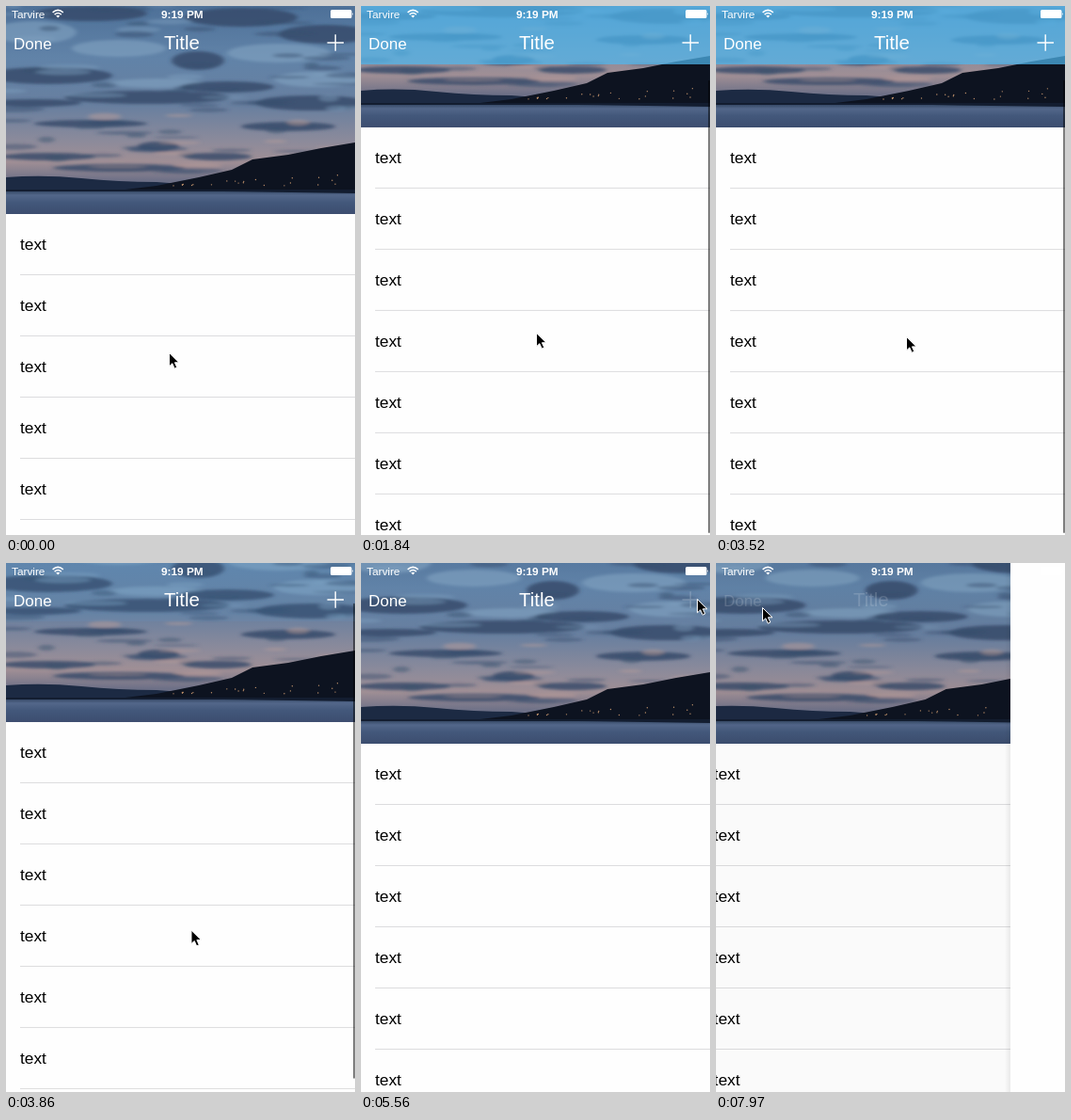
An HTML page that plays this animation: 371 by 562 pixels, repeating every 8 s.

```html
<!DOCTYPE html>
<html lang="en">
<head>
<meta charset="utf-8">
<title>Fading navigation bar</title>
<style>
  html, body { margin: 0; width: 100%; height: 100%; overflow: hidden; background: #fff; }
  svg { display: block; }
  text { font-family: "Liberation Sans", Arial, sans-serif; }
  .row { font-size: 17.3px; fill: #000; }
  .nav { font-size: 17px; fill: #fff; }
  .status { font-size: 11.8px; fill: #fff; }
  .line { fill: none; stroke: #fff; }
</style>
</head>
<body>
<svg width="371" height="562" viewBox="0 0 371 562">
  <defs>
    <linearGradient id="sky" x2="0" y2="1">
      <stop offset="0" stop-color="#4d7098"/>
      <stop offset=".25" stop-color="#6183a8"/>
      <stop offset=".48" stop-color="#687f9f"/>
      <stop offset=".64" stop-color="#8a8a9b"/>
      <stop offset=".75" stop-color="#a08f95"/>
      <stop offset=".84" stop-color="#6d7087"/>
    </linearGradient>
    <linearGradient id="lake" x2="0" y2="1">
      <stop offset="0" stop-color="#30435f"/>
      <stop offset=".2" stop-color="#53678a"/>
      <stop offset=".5" stop-color="#43587b"/>
      <stop offset="1" stop-color="#3c4d6f"/>
    </linearGradient>
    <linearGradient id="shade">
      <stop offset="0" stop-opacity="0"/>
      <stop offset="1" stop-opacity=".07"/>
    </linearGradient>
    <filter id="soft" x="-10%" y="-10%" width="120%" height="120%">
      <feGaussianBlur stdDeviation="2.6 1.5"/>
    </filter>
  </defs>

  <g id="home">
    <rect width="371" height="562" fill="#fefefe"/>
    <g id="list">
      <svg width="371" height="221">
        <rect width="371" height="221" fill="url(#sky)"/>
        <g id="clouds" filter="url(#soft)"></g>
        <path d="M0 182Q40 179 80 183T160 187L200 190V198H0Z" fill="#1c2a43"/>
        <path d="M110 197L160 191 205 182 240 174 262 163 300 158 335 151 371 145V199Z" fill="#0d1320"/>
        <rect y="196" width="371" height="25" fill="url(#lake)"/>
        <path d="M0 195H371V199L230 197H0Z" fill="#131d30"/>
        <g id="lights" fill="#b98d68"></g>
      </svg>
      <g id="rows"></g>
    </g>
    <rect id="thumb" x="369" width="2" rx="1" fill="#000"/>
    <rect id="dim" width="371" height="562"/>
  </g>

  <g id="detail">
    <rect x="-6" width="6" height="562" fill="url(#shade)"/>
    <rect width="371" height="562" fill="#fefefe"/>
  </g>

  <rect id="bar" width="371" height="62" fill="#50b8ee"/>
  <g id="homeItems">
    <text class="nav" x="8" y="46">Done</text>
    <path id="plus" class="line" d="M341.5 39H359M350.2 30.2V47.8" stroke-width="1.4"/>
  </g>
  <text id="title" class="nav" y="46" style="font-size:20.4px">Title</text>
  <path id="chevron" class="line" d="M20 30.5L10.5 40 20 49.5" stroke-width="3"/>
  <text id="back" class="nav" y="46">Title</text>

  <text class="status" x="6" y="12.5">Tarvire</text>
  <g class="line" stroke-width="1.5">
    <path d="M49.6 6.9Q55.2 1.9 60.8 6.9M51.6 9.1Q55.2 5.9 58.8 9.1"/>
    <path d="M53.2 10.4Q55.2 8.9 57.2 10.4L55.2 12.6Z" fill="#fff" stroke="none"/>
  </g>
  <text class="status" x="187.3" y="12.5" text-anchor="middle" font-weight="bold">9:19 PM</text>
  <path d="M346.5 4H366Q367.5 4 367.5 5.5V11.5Q367.5 13 366 13H346.5Q345 13 345 11.5V5.5Q345 4 346.5 4ZM368.3 7Q370 8.5 368.3 10Z" fill="#fff"/>

  <path id="cursor" d="M.5 .5V14.8L3.8 11.8 6.2 17.2 8.8 16 6.4 10.8H11Z" fill="#000" stroke="#fff"/>
</svg>

<script>
const $ = id => document.getElementById(id);
const W = 371, LOOP = 8000, PUSH = 6330, POP = 7800;
const clamp = v => Math.max(0, Math.min(1, v));

// Keys are [time, value]; smooth between them without overshoot.
const scroll = [[870, 0], [1220, 30], [1840, 92], [2400, 146], [2700, 158], [3000, 146], [3520, 92], [4200, 29]];
const cursorX = [[260, 173], [480, 170], [700, 173], [1220, 173], [1840, 186], [2700, 200], [3520, 202],
  [4200, 191], [4430, 191], [4730, 360], [5000, 360], [5140, 357], [6700, 357], [7110, 139], [7450, 49]];
const cursorY = [[260, 368], [700, 452], [870, 452], [1220, 409], [1840, 347], [2700, 279], [3520, 351],
  [4200, 413], [4430, 413], [4730, 30], [5000, 30], [5140, 38], [6700, 38], [7110, 75], [7450, 47]];

function slope(keys, i) {
  if (i === 0 || i === keys.length - 1) return 0;
  const rate = k => (keys[k + 1][1] - keys[k][1]) / (keys[k + 1][0] - keys[k][0]);
  const a = rate(i - 1), b = rate(i);
  return a * b <= 0 ? 0 : 2 * a * b / (a + b);
}

function valueAt(keys, t) {
  if (t <= keys[0][0]) return keys[0][1];
  const i = keys.findIndex(k => k[0] > t) - 1;
  if (i < 0) return keys[keys.length - 1][1];
  const [t0, v0] = keys[i], [t1, v1] = keys[i + 1];
  const d = t1 - t0, u = (t - t0) / d, u2 = u * u, u3 = u2 * u;
  return v0 + (v1 - v0) * (3 * u2 - 2 * u3)
    + d * (slope(keys, i) * (u3 - 2 * u2 + u) + slope(keys, i + 1) * (u3 - u2));
}

// Critically damped spring from 0 to 1.
function spring(ms) {
  const x = Math.max(0, ms) * 0.0194;
  return 1 - (1 + x) * Math.exp(-x);
}

function buildPhoto() {
  let seed = 11;
  const rand = () => (seed = (seed * 16807) % 2147483647) / 2147483647;
  const oval = (x, y, rx, ry, fill, o) =>
    `<ellipse cx="${x}" cy="${y}" rx="${rx}" ry="${ry}" fill="${fill}" opacity="${o}"/>`;
  const light = [[30, 28, 45, 12], [120, 45, 50, 9], [290, 50, 55, 10], [160, 82, 50, 5], [330, 78, 45, 8]];
  const dark = [[90, 8, 60, 8], [250, 12, 60, 10], [204, 58, 28, 10], [340, 30, 50, 10], [45, 74, 68, 9],
    [150, 97, 88, 7], [235, 86, 50, 6], [325, 103, 60, 8], [30, 103, 50, 4], [90, 125, 60, 4],
    [162, 149, 22, 5], [225, 160, 36, 4], [300, 128, 50, 5], [45, 160, 50, 4], [120, 172, 70, 4]];
  let html = light.map(c => oval(...c, '#83a3c2', .6)).join('');
  html += dark.map(c => oval(...c, '#324968', .8)).join('');
  for (let i = 0; i < 80; i++) {
    const y = rand() * 178;
    const tone = i % 3 ? '#354d6d' : y > 110 ? '#c0a19a' : '#7f9fbe';
    html += oval(rand() * W, y, 8 + rand() * 26, 1 + rand() * 2.5, tone, .45);
  }
  $('clouds').innerHTML = html;
  for (let i = 0; i < 22; i++) {
    const x = 175 + rand() * 185;
    $('lights').innerHTML += `<circle cx="${x}" cy="${191 - rand() * (x - 165) * .08}" r=".7"/>`;
  }
}

function buildRows() {
  let html = '';
  for (let i = 0; i < 9; i++) {
    const y = 221 + i * 65;
    html += `<text class="row" x="15" y="${y + 38}">text</text>`
      + `<rect x="15" y="${y + 64}" width="356" height="1" fill="#dcdcde"/>`;
  }
  $('rows').innerHTML = html;
}

const move = (id, x, y = 0) => $(id).setAttribute('transform', `translate(${x} ${y})`);
const fade = (id, o) => $(id).setAttribute('opacity', o);

function render(t) {
  const offset = valueAt(scroll, t);
  const p = t < POP ? spring(t - PUSH) : 1 - spring(t - POP);
  const pushed = t >= PUSH && t < POP;

  move('list', 0, -offset);
  move('home', -0.3 * W * p);
  fade('dim', 0.1 * p);
  move('detail', W * (1 - p));
  $('detail').setAttribute('visibility', p > 0 ? 'visible' : 'hidden');

  const top = 23 + (offset - 30) * 0.9;
  $('thumb').setAttribute('y', top);
  $('thumb').setAttribute('height', Math.min(560, top + 505) - top);
  fade('thumb', 0.5 * clamp((t - 850) / 100) * clamp((4730 - t) / 290));

  fade('bar', pushed ? 1 : clamp((offset - 48) / 62));
  const homeAlpha = clamp((0.18 - p) / 0.15), backAlpha = clamp((p - 0.82) / 0.15);
  const titleX = 168 - 141 * p;
  fade('homeItems', homeAlpha);
  fade('plus', t >= 5560 && t < POP ? 0.2 : 1);
  fade('title', homeAlpha);
  fade('back', backAlpha);
  fade('chevron', backAlpha);
  move('title', titleX);
  move('back', titleX);

  move('cursor', valueAt(cursorX, t), valueAt(cursorY, t));
}

buildPhoto();
buildRows();
const start = performance.now();
function tick() {
  render((performance.now() - start) % LOOP);
  requestAnimationFrame(tick);
}
tick();
</script>
</body>
</html>
```
